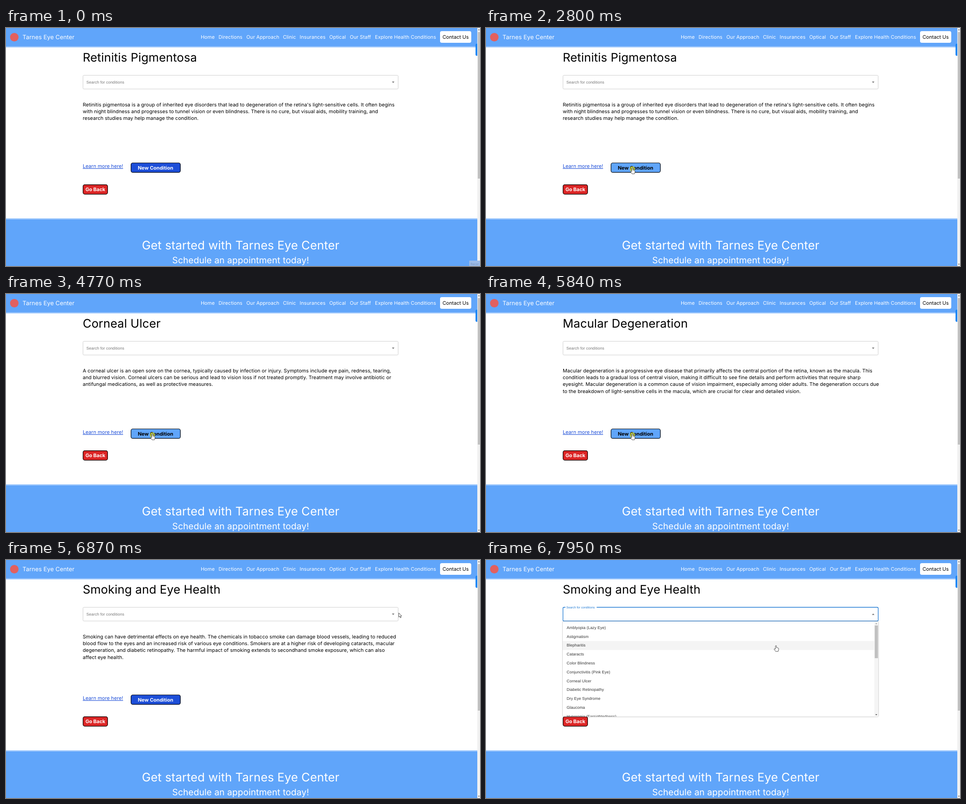
Recreate the animation shown at these times as an HTML page. Size 1056 px wide and 531 px high, loop 8000 ms.

```html
<!DOCTYPE html>
<html lang="en">
<head>
<meta charset="utf-8">
<title>Eye conditions</title>
<style>
  html, body { margin: 0; height: 100%; overflow: hidden; background: #fff; }
  svg { display: block; width: 100vw; height: 100vh; }
  text {
    font: 11px Inter, sans-serif;
    font-optical-sizing: none;
    letter-spacing: .005em;
    text-rendering: geometricPrecision;
    fill: #000;
  }
  .big { font-size: 26.4px; }
  .mid { font-size: 19.8px; }
  .light text, text.light { fill: #fff; }
  .mui, .mui text { font: 8.8px "Liberation Sans", Arial, sans-serif; letter-spacing: .00938em; fill: #333; }
  .center { text-anchor: middle; }
  .bold { font-weight: 700; letter-spacing: 0; }
  .btn { stroke: #000; stroke-width: 1.2; }
  #paper { filter: drop-shadow(0 .8px .8px rgba(0, 0, 0, .45)); }
  .pointer { fill: #fff; stroke: #222; stroke-width: .8; stroke-linejoin: round; }
</style>
</head>
<body>
<svg viewBox="0 0 1056 531">
  <rect width="1056" height="531" fill="#fff"/>

  <!-- header -->
  <rect width="1050" height="43" fill="#60a5fa"/>
  <rect y="41" width="1050" height="1" fill="#c4dcfd"/>
  <circle cx="18.5" cy="20.5" r="9.5" fill="#e2605f"/>
  <text class="light" x="36.8" y="24.6" style="font-size:13.2px">Tarnes Eye Center</text>
  <g id="nav" class="light"></g>
  <rect x="967" y="7" width="69.5" height="26" rx="4" fill="#fff"/>
  <text class="center" x="1001.7" y="24">Contact Us</text>

  <!-- condition -->
  <text id="title" class="big" x="171" y="75"></text>
  <g id="body"></g>
  <text x="171" y="312" style="fill:#1d4ed8;text-decoration:underline">Learn more here!</text>
  <rect id="newBtn" class="btn" x="278.5" y="301" width="110" height="21.2" rx="4"/>
  <text id="newText" class="center bold" x="333.2" y="315.5">New Condition</text>
  <rect class="btn" x="171.6" y="349.6" width="54.8" height="21.2" rx="4" fill="#dc2626"/>
  <text class="center bold light" x="199" y="364.2">Go Back</text>

  <!-- search box -->
  <rect id="field" x="171.5" y="105.5" width="702.2" height="30.6" rx="2.2" fill="#fff"/>
  <rect id="notch" x="177" y="103.5" height="4" fill="#fff"/>
  <text id="label" class="mui">Search for conditions</text>
  <path id="caret" d="M-2.8-1.4H2.8L0 1.4Z" fill="#6b6b6b"/>

  <!-- option list -->
  <g id="list">
    <rect id="paper" x="171" y="137" width="703" height="212.6" rx="2" fill="#fff"/>
    <rect id="mark" x="171" width="694" height="19.8" fill="#f4f4f4"/>
    <clipPath id="clip"><rect x="171" y="137" width="703" height="212.6"/></clipPath>
    <g id="options" class="mui" clip-path="url(#clip)"></g>
    <rect x="865" y="137" width="9" height="212.6" fill="#f5f5f5"/>
    <rect x="866" y="146" width="7.2" height="73" fill="#c1c1c1"/>
    <path d="M867.3 143h4.4l-2.2-2.4Z" fill="#a0a0a0"/>
    <path d="M867.3 344h4.4l-2.2 2.4Z" fill="#505050"/>
  </g>

  <!-- footer -->
  <rect y="425" width="1050" height="106" fill="#60a5fa"/>
  <rect y="426" width="1050" height="1" fill="#c4dcfd"/>
  <text class="big center light" x="522.8" y="494">Get started with Tarnes Eye Center</text>
  <text class="mid center light" x="522.8" y="525">Schedule an appointment today!</text>

  <!-- page scrollbar and side tab -->
  <rect x="1050" width="6" height="531" fill="#f1f1f1"/>
  <rect x="1051" y="9" width="5" height="327" fill="#c1c1c1"/>
  <path d="M1051.5 5h4l-2-2.4ZM1051.5 526h4l-2 2.4Z" fill="#707070"/>
  <path d="M1050 35h-1.5q-2.5 0-2.5 3v21q0 3 2.5 3h1.5Z" fill="#1a86f5"/>

  <g id="tip">
    <rect x="1032" y="519" width="24" height="12" fill="#9dbbe6"/>
    <text x="1035" y="528.5" style="font-size:6.6px;fill:#7391bd">Recor</text>
  </g>

  <circle id="click" r="6" fill="#e8e000" opacity=".6"/>
  <path id="arrow" class="pointer" d="M0 0V9.4L2.2 7.5 3.8 11 5.3 10.3 3.8 6.9H6.6Z"/>
  <path id="hand" class="pointer" d="M-1.2 8V1.2A1.2 1.2 0 0 1 1.2 1.2V4.6Q2.2 4 3 5 4 4.5 4.6 5.5 5.8 5.2 5.9 6.6V9.4L4.8 13H-.6L-4 8.4Q-4.2 6.8-2.8 7Z"/>
</svg>

<script>
const LOOP = 8000, ROW = 19.8, TOP = 141.2;
const $ = id => document.getElementById(id);
const show = (id, on) => $(id).style.display = on ? "" : "none";
const clamp = v => Math.min(1, Math.max(0, v));

function addText(parent, x, y, str) {
  const el = document.createElementNS("http://www.w3.org/2000/svg", "text");
  el.setAttribute("x", x);
  el.setAttribute("y", y);
  el.textContent = str;
  $(parent).append(el);
}

const nav = {
  "Home": 433.9, "Directions": 473.6, "Our Approach": 535.4, "Clinic": 616.9,
  "Insurances": 654.3, "Optical": 720.2, "Our Staff": 766, "Explore Health Conditions": 822
};
for (const name in nav) addText("nav", nav[name], 24, name);

["Amblyopia (Lazy Eye)", "Astigmatism", "Blepharitis", "Cataracts", "Color Blindness",
 "Conjunctivitis (Pink Eye)", "Corneal Ulcer", "Diabetic Retinopathy", "Dry Eye Syndrome",
 "Glaucoma", "Hyperopia (Farsightedness)"
].forEach((name, i) => addText("options", 179.8, TOP + ROW * i + 12.6, name));

// each condition: start time, title, lines
const conditions = [
  [0, "Retinitis Pigmentosa",
    "Retinitis pigmentosa is a group of inherited eye disorders that lead to degeneration of the retina's light-sensitive cells. It often begins",
    "with night blindness and progresses to tunnel vision or even blindness. There is no cure, but visual aids, mobility training, and",
    "research studies may help manage the condition."],
  [2860, "Glaucoma",
    "Glaucoma is a group of eye conditions that damage the optic nerve, often caused by high pressure inside the eye. It can lead to gradual loss",
    "of vision and even blindness if left untreated. Treatment may include eye drops, oral medications, laser therapy, or surgery to lower",
    "pressure and protect the optic nerve."],
  [3850, "Corneal Ulcer",
    "A corneal ulcer is an open sore on the cornea, typically caused by infection or injury. Symptoms include eye pain, redness, tearing,",
    "and blurred vision. Corneal ulcers can be serious and lead to vision loss if not treated promptly. Treatment may involve antibiotic or",
    "antifungal medications, as well as protective measures."],
  [4900, "Macular Degeneration",
    "Macular degeneration is a progressive eye disease that primarily affects the central portion of the retina, known as the macula. This",
    "condition leads to a gradual loss of central vision, making it difficult to see fine details and perform activities that require sharp",
    "eyesight. Macular degeneration is a common cause of vision impairment, especially among older adults. The degeneration occurs due",
    "to the breakdown of light-sensitive cells in the macula, which are crucial for clear and detailed vision."],
  [5970, "Smoking and Eye Health",
    "Smoking can have detrimental effects on eye health. The chemicals in tobacco smoke can damage blood vessels, leading to reduced",
    "blood flow to the eyes and an increased risk of various eye conditions. Smokers are at a higher risk of developing cataracts, macular",
    "degeneration, and diabetic retinopathy. The harmful impact of smoking extends to secondhand smoke exposure, which can also",
    "affect eye health."]
];

let shown = null;
function setCondition(c) {
  if (c === shown) return;
  shown = c;
  const [, title, ...lines] = c;
  $("title").textContent = title;
  $("body").replaceChildren();
  lines.forEach((line, i) => addText("body", 171, 174.5 + 15.4 * i, line));
}

const easeOut = p => 1 - (1 - p) ** 2;
const easeBoth = p => p < .5 ? 4 * p ** 3 : 1 - 4 * (1 - p) ** 3;

// pointer moves: first step, last step, step count, target x, y, easing, upward bend
const moves = [
  [70, 410, 6, 581, 292.5, easeOut, 0],
  [1530, 2300, 12, 267, 295, easeBoth, 19],
  [2370, 2580, 4, 326, 312.4, easeOut, 0],
  [6170, 6870, 11, 875, 118, easeBoth, 0],
  [7000, 7070, 2, 864, 120, easeOut, 0],
  [7400, 7950, 9, 646, 191, easeBoth, 0]
];

function pointerAt(t) {
  let x = 1040, y = 526;
  for (const [t0, t1, n, tx, ty, ease, bend] of moves) {
    if (t < t0) break;
    const step = Math.floor((t - t0) / (t1 - t0) * (n - 1) + 1e-6) + 1;
    const p = ease(clamp(step / n));
    x += (tx - x) * p;
    y += (ty - y) * p - bend * 4 * p * (1 - p);
  }
  return [x, y];
}

const clicks = [[2800, 2860], [3780, 3850], [4770, 4900], [5840, 5970], [7270, 7340]];
const OPEN = 7340;

function draw(t) {
  setCondition(conditions.findLast(c => t >= c[0]));

  const [x, y] = pointerAt(t);
  const open = t >= OPEN;
  const onBtn = x > 278 && x < 389 && y > 300 && y < 323;
  const onField = x > 171 && x < 874 && y > 105 && y < 137;
  const onList = open && y > TOP && x < 865;
  const hand = onBtn || onList || (onField && x > 852);

  $("newBtn").setAttribute("fill", onBtn ? "#60a5fa" : "#1d4ed8");
  $("newText").style.fill = onBtn ? "#000" : "#fff";

  $("field").setAttribute("stroke", open ? "#1976d2" : onField ? "#4d4d4d" : "#cacaca");
  $("field").setAttribute("stroke-width", open ? 1.3 : .9);
  const float = easeOut(clamp((t - OPEN) / 200));
  $("notch").setAttribute("width", 69.5 * float);
  $("label").setAttribute("transform", `translate(179 ${123.7 - 16.2 * float}) scale(${1 - .25 * float})`);
  $("label").style.fill = open ? "#1976d2" : "#757575";
  $("caret").setAttribute("transform", `translate(862.6 121) scale(1 ${open ? -1 : 1})`);

  show("list", open);
  show("mark", onList);
  $("mark").setAttribute("y", TOP + ROW * Math.max(0, Math.floor((y - TOP) / ROW)));

  show("tip", t < 70);
  show("click", clicks.some(([a, b]) => t >= a && t < b));
  show("arrow", t >= 70 && !hand);
  show("hand", hand);
  $("click").setAttribute("transform", `translate(${x} ${y + 2})`);
  for (const id of ["arrow", "hand"]) $(id).setAttribute("transform", `translate(${x} ${y})`);
}

const start = performance.now();
function tick() {
  draw((performance.now() - start) % LOOP);
  requestAnimationFrame(tick);
}
tick();
</script>
</body>
</html>
```
